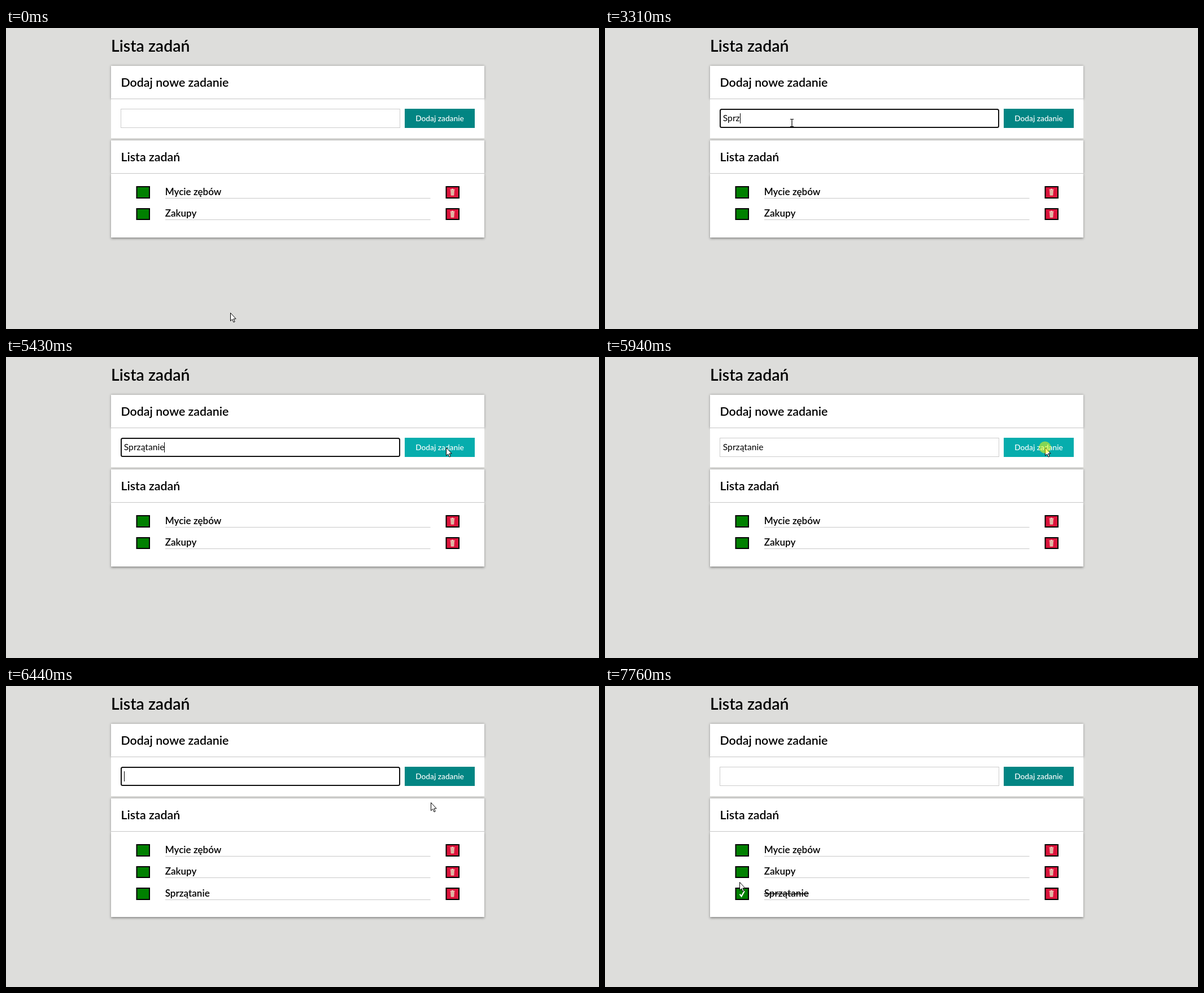
Animation of 1050 by 533 pixels, one loop 8 s. Source, as an HTML page:

```html
<!DOCTYPE html>
<html lang="pl">
<head>
<meta charset="utf-8">
<title>Lista zadań</title>
<style>
  html, body { margin: 0; width: 100%; height: 100%; overflow: hidden; background: #dddddb; }
  body { position: relative; }
  .panel { position: absolute; left: 186px; width: 661px; background: #fff; }
  .head { height: 58px; border-bottom: 1px solid #c6c6c6; box-shadow: 0 0 4px rgba(0, 0, 0, .36); }
  #formBody { top: 126px; height: 69px; }
  #listBody { top: 258px; height: 113px; box-shadow: 0 2px 4px rgba(0, 0, 0, .4); clip-path: inset(0 -9px -9px); }
  svg { position: absolute; left: 0; top: 0; width: 1050px; height: 533px; font-family: Lato, sans-serif; }
  .h1, .h2, .item { font-weight: 600; }
  .h1 { font-size: 28.45px; }
  .h2 { font-size: 21.35px; }
  .item { font-size: 17.08px; }
  .field { font-size: 15.65px; }
  .label { font-size: 13.75px; font-weight: 500; fill: #fff; }
</style>
</head>
<body>
<div class="panel head" style="top:67px"></div>
<div class="panel head" style="top:199px"></div>
<div class="panel" id="formBody"></div>
<div class="panel" id="listBody"></div>

<svg viewBox="0 0 1050 533">
  <defs>
    <g id="trash">
      <path d="M-4 -4.5H4M-1.4 -5.6H1.4" stroke="#f0d8c4" stroke-width="1.3"/>
      <path d="M-3.3 -3.5H3.3L2.7 5.6H-2.7Z" fill="#ecd0b8"/>
      <path d="M-1.2 -2.5V4.5M1.2 -2.5V4.5" stroke="#c08078" stroke-width=".8"/>
    </g>
  </defs>
  <text class="h1" x="186" y="41.5">Lista zadań</text>
  <text class="h2" x="203.5" y="104.3">Dodaj nowe zadanie</text>
  <text class="h2" x="203.5" y="236.3">Lista zadań</text>

  <rect id="plain" x="203.5" y="143.5" width="494" height="33" fill="#fff" stroke="#ccc"/>
  <rect id="ring" x="204" y="144" width="493" height="32" rx="2.5" fill="#fff" stroke="#101010" stroke-width="2"/>
  <text id="typed" class="field" x="208.8" y="165.3"></text>
  <rect id="caret" y="151" width="1" height="18"/>

  <rect id="button" x="706" y="143" width="124" height="34"/>
  <text class="label" x="768" y="165.3" text-anchor="middle">Dodaj zadanie</text>

  <g id="rows"></g>

  <path id="arrow" d="M.5 .5V14.8L3.7 11.8L6 17L8.2 16L5.9 11H10.2Z" fill="#fff" stroke="#000"/>
  <path id="beam" d="M-3 -6.5H-.8L0 -6L.8 -6.5H3M0 -6V6M-3 6.5H-.8L0 6L.8 6.5H3" fill="none" stroke="#000" stroke-width="1.2"/>
  <circle id="halo" r="10.5" fill="#ff0" fill-opacity=".5"/>
</svg>

<script>
const LOOP = 8000, TICK = 100;
const WORD = "Sprzątanie";
const FOCUS = 2010, TYPE = 2710, KEY = 190;
const PRESS = 5740, SUBMIT = 6040, BLUR = 7260, CHECK = 7360;

// pointer legs: start, end, goal, and a bend point where the path curves
const HOME = [397, 504];
const LEGS = [
  { from: 590, to: 1190, goal: [330, 207] },
  { from: 1330, to: 1630, goal: [331, 168] },
  { from: 5130, to: 5430, goal: [779, 160] },
  { from: 6290, to: 7160, goal: [242, 371], bend: [586, 510] },
  { from: 7460, to: 7730, goal: [238, 347] }
];

const $ = id => document.getElementById(id);
const show = (id, on) => $(id).setAttribute("visibility", on ? "visible" : "hidden");
const between = (t, from, to) => t >= from && t < to;
const clamp = u => Math.min(1, Math.max(0, u));
const ease = u => u * u * (3 - 2 * u);

// the pointer is sampled once per tick
function pointer(time) {
  const t = Math.floor((time - 30) / TICK) * TICK + 30;
  return LEGS.reduce((pos, { from, to, goal, bend }) => {
    const u = ease(clamp((t - from) / (to - from))), v = 1 - u;
    return pos.map((p, i) => bend
      ? v * v * p + 2 * u * v * bend[i] + u * u * goal[i]
      : v * p + u * goal[i]);
  }, HOME);
}

function row(name, i) {
  const y = 280.2 + i * 38.5;
  const top = Math.round(y), height = Math.round(y + 21.4) - top;
  const box = (x, fill) =>
    `<rect x="${x}" y="${top + 1}" width="22.5" height="${height - 2}" fill="${fill}" stroke="#000" stroke-width="2"/>`;
  return `<g id="row${i}">${box(231.5, "green")}${box(779.5, "crimson")}
    <use href="#trash" x="790.5" y="${top + 11}"/>
    <text class="item" x="281.7" y="${y + 15.3}">${name}</text>
    <path d="M282 ${Math.floor(y + 21) + .5}H751.5" stroke="#c8c8c8"/></g>`;
}
$("rows").innerHTML = ["Mycie zębów", "Zakupy", WORD].map(row).join("") +
  `<g id="done"><path d="M238.6 368.6L241.6 372.4L246.8 363" fill="none" stroke="#fff" stroke-width="2.2"/>
   <path id="strike" stroke="#000" stroke-width="1.5"/></g>`;
const itemText = document.querySelector("#row2 text");

function draw(t) {
  const added = t >= SUBMIT;
  const focused = between(t, FOCUS, PRESS) || between(t, SUBMIT, BLUR);
  const count = added ? 0 : Math.min(WORD.length, Math.max(0, Math.floor((t - TYPE) / KEY) + 1));
  $("typed").textContent = WORD.slice(0, count);
  show("plain", !focused);
  show("ring", focused);

  // typing restarts the caret's blink
  const reset = added ? SUBMIT : count ? TYPE + (count - 1) * KEY : FOCUS;
  const end = count ? $("typed").getComputedTextLength() : 0;
  $("caret").setAttribute("x", Math.round(208.8 + end));
  show("caret", focused && (t - reset) % 1000 < 500);

  const [x, y] = pointer(t);
  const inBand = between(y, 143, 177);
  const overField = inBand && between(x, 203, 698);
  const hover = inBand && between(x, 706, 830);
  $("button").setAttribute("fill", hover ? "#06adad" : "#028583");
  show("arrow", !overField);
  show("beam", overField);
  for (const id of ["arrow", "beam", "halo"])
    $(id).setAttribute("transform", `translate(${Math.round(x)} ${Math.round(y)})`);
  show("halo", between(t, FOCUS, FOCUS + TICK) || between(t, PRESS, SUBMIT) || between(t, BLUR, BLUR + 2 * TICK));

  show("row2", added);
  $("listBody").style.height = (added ? 151 : 113) + "px";
  show("done", t >= CHECK);
  $("strike").setAttribute("d", `M281.7 368H${281.7 + itemText.getComputedTextLength()}`);
}

const start = performance.now();
function tick() {
  draw((performance.now() - start) % LOOP);
  requestAnimationFrame(tick);
}
tick();
</script>
</body>
</html>
```
